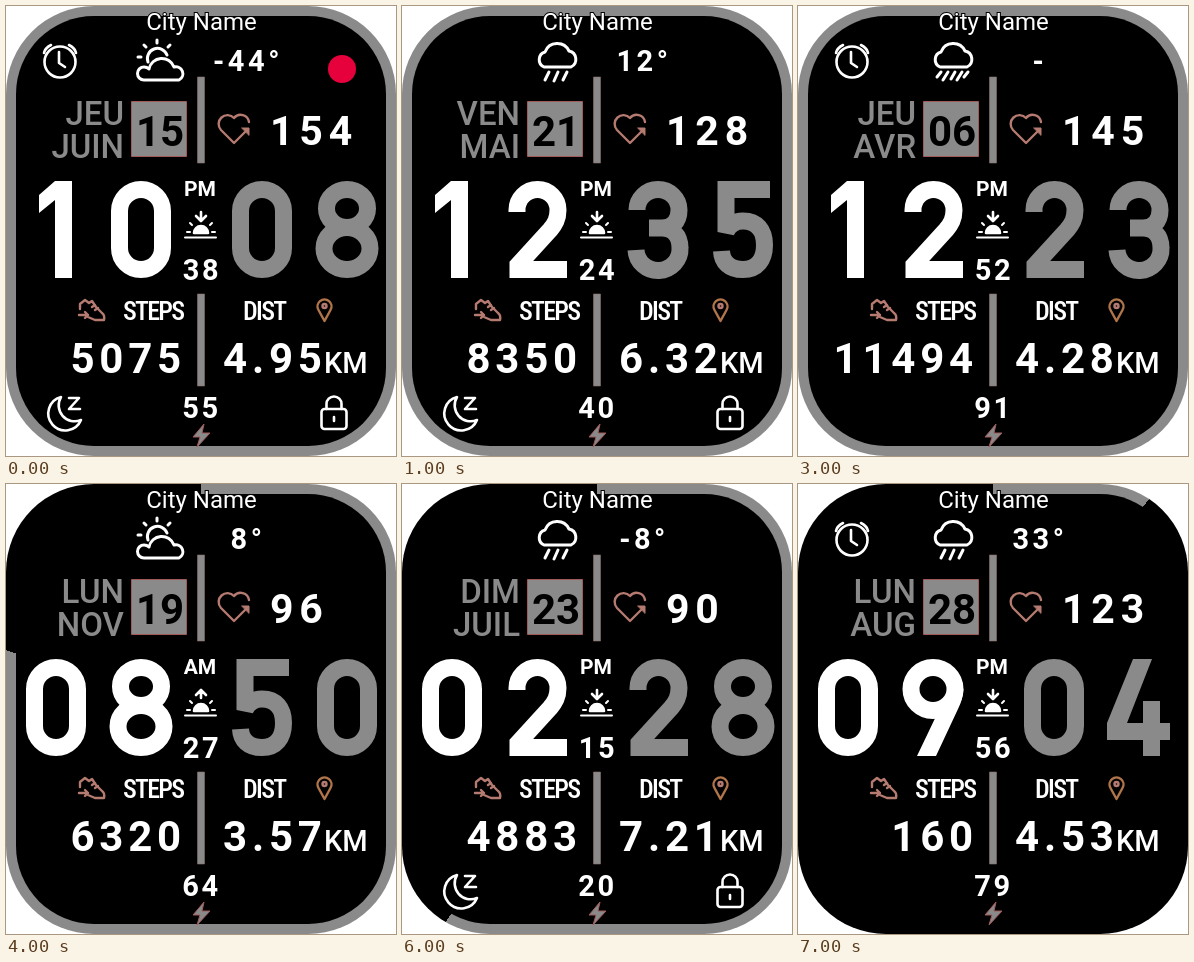
Recreate the animation shown at these times as an HTML page. Size 390 px wide and 450 px high, loop 8000 ms.

```html
<!DOCTYPE html>
<html lang="fr">
<head>
<meta charset="utf-8">
<style>
  html, body { margin: 0; width: 100%; height: 100%; overflow: hidden; background: #fff }
  #ring { position: absolute; width: 390px; height: 450px; border-radius: 88px }
  #ring::after { content: ""; position: absolute; inset: 10px; border-radius: 78px; background: #000 }
  svg { position: absolute; left: 0; top: 0 }
  text { font: 700 41px Roboto, sans-serif; fill: #fff }
  .grey { fill: #8a8a8a }
  .right { text-anchor: end }
  .mid { text-anchor: middle }
  .date { font-size: 33px; font-weight: 500 }
  .value { letter-spacing: 5.8px }
  .low { font-size: 42px; letter-spacing: 4.8px }
  .small { font-size: 29px; letter-spacing: 2.5px }
  .label { font: 500 26px "Roboto Condensed", Roboto, sans-serif; font-stretch: 75%; letter-spacing: -1.7px }
  .city { font-size: 24px; font-weight: 400; stroke: #000; stroke-width: 2; paint-order: stroke }
  .line { fill: none; stroke: currentColor; stroke-width: 17 }
  .fill { fill: currentColor }
  .icon { fill: none; stroke: #fff; stroke-width: 3; stroke-linecap: round; stroke-linejoin: round }
  .thin { stroke-width: 2.6 }
  .rose { stroke: #b57a70; stroke-width: 2.4 }
  .gold { stroke: #b0754a }
  .edged { fill: #8a8a8a; stroke: #a05a5a }
</style>
</head>
<body>
<div id="ring"></div>
<svg width="390" height="450" viewBox="0 0 390 450">
  <defs>
    <rect id="d0" class="line" x="8.5" y="8.5" width="43" height="80" rx="21.5"/>
    <path id="d1" class="fill" d="M46 0H29L13 14V32L29 19V97H46z"/>
    <path id="d2" class="line" d="M10 31V29a20.500 20.500 0 0 1 41 0c0 9-3 14-8 20L11 84V88.500H60"/>
    <path id="d3" class="line" d="M9 29a21 20.500 0 0 1 42 0c0 12-7 18-17 18H21H34c10 0 18 7 18 20a22 21.500 0 0 1-44 2"/>
    <path id="d4" class="fill" d="M24 0H43L18 64H34V42H51V64H61V81H51V97H34V81H-2V64z"/>
    <path id="d5" class="line" d="M57 8.500H13V51c3-7 9-11 17-11c14 0 21.500 9 21.500 24S44 88.500 30 88.500S9 81 8.500 70"/>
    <g id="d8" class="line"><ellipse cx="30" cy="27.5" rx="20.5" ry="19"/><ellipse cx="30" cy="67.5" rx="23" ry="21"/></g>
    <g id="d9"><ellipse class="line" cx="30" cy="30" rx="22" ry="21.5"/><path class="fill" d="M60.500 30Q60 40 55 50L33 97H14L36 51z"/></g>
  </defs>

  <path class="grey" d="M191.500 71h7v86h-7zM191.500 288h7v92h-7z" stroke="#8c6c6c" stroke-width=".6"/>
  <path class="edged" d="M125.500 95.500h55v55h-55z"/>
  <text class="city mid" x="195.500" y="24">City Name</text>
  <text class="label" x="117" y="314">STEPS</text>
  <text class="label" x="237" y="314">DIST</text>
  <text x="318" y="367" style="font-size:29px;font-weight:500">KM</text>

  <text id="day" class="date grey right" x="118" y="119"/>
  <text id="month" class="date grey right" x="118" y="152"/>
  <text id="date" class="mid" x="154" y="140" style="fill:#000;font-size:42px"/>
  <text id="temp" class="small mid" x="242" y="65" style="letter-spacing:3.5px"/>
  <text id="pulse" class="value" x="264" y="139"/>
  <text id="half" class="mid" x="194" y="190" style="font-size:21px"/>
  <text id="second" class="small mid" x="196" y="274"/>
  <text id="steps" class="low right" x="180" y="367"/>
  <text id="distance" class="low" x="217" y="367"/>
  <text id="battery" class="small mid" x="195.500" y="412"/>
  <g id="clock"></g>

  <g class="icon rose">
    <path d="M228 137l-13-13a8 8 0 0 1 13-12a8.500 8.500 0 0 1 15 4M228 137l12-12"/>
    <path d="M236 122h7v7z" fill="#b57a70" stroke-width="1"/>
    <path d="M74 303v-5l5-4 4 3 3-2 4 6 6 6q3 2 2 7h-9l-7-3M73 309h9M79 306l3 3-3 3M86 301l3-2M89 304l3-2"/>
    <path class="gold" d="M318.500 315l-6-11a7 7 0 1 1 12 0z"/>
    <circle cx="318.500" cy="300" r="2"/>
  </g>
  <path class="edged" d="M198 418l-11 13h7l-3 10 13-14h-8z"/>

  <g class="icon thin">
    <path d="M179 231.500h31M181 226h3M206 226h3M184 217l2 2M206 217l-2 2" stroke-width="2"/>
    <path d="M188 227a7 7 0 0 1 14 0z" fill="#fff"/>
    <path id="am" d="M195 214v-7M190 211l5-5 5 5"/>
    <path id="pm" d="M195 206v8M190 210l5 5 5-5"/>
  </g>
  <g id="alarm" class="icon thin">
    <circle cx="54" cy="56" r="15.500"/><path d="M53 46v11l6 4M38 47q1-5 7-8M70 47q-1-5-7-8"/>
  </g>
  <circle id="wireless" cx="336" cy="63" r="14" fill="#e6003c"/>
  <path id="moon" class="icon thin" d="M55 391a17 17 0 1 0 20 23a16 16 0 0 1-20-23zM63 392h10l-10 11h11"/>
  <g id="lock" class="icon thin">
    <rect x="315.500" y="403" width="25" height="20" rx="3"/><path d="M320.500 403v-5a7.500 7.500 0 0 1 15 0v5M328 411v4"/>
  </g>
  <g id="sunny" class="icon">
    <path d="M138 74a6 6 0 0 1 0-13q3 0 5 2a13 13 0 0 1 25-2a7 7 0 0 1 5 13zM142 56a10 10 0 0 1 19-7M151 34v3M138 39l2 2M164 39l-2 2M132 51h3"/>
  </g>
  <g id="cloud" class="icon">
    <path d="M142 61a8 8 0 0 1 1-15a13 13 0 0 1 24-1a8.500 8.500 0 0 1 2 16z"/>
    <path id="rain" d="M147 66l-4 8M156 66l-4 9M165 66l-4 8"/>
    <path id="shower" d="M143 66l-4 5M150 66l-5 8M157 66l-4 7M164 66l-5 8M170 66l-4 5"/>
  </g>
  <g id="haze" class="icon">
    <path d="M155 55c-5-6-8-8-12-8a8 8 0 0 0 0 16c4 0 7-2 12-8s8-8 12-8a8 8 0 0 1 0 16c-4 0-7-2-12-8z"/>
    <path stroke-width="5" d="M143 38h0M155 38h0M167 38h0M143 72h0M155 72h0M167 72h0"/>
  </g>
</svg>
<script>
const fields = ["day", "month", "date", "half", "second", "temp", "pulse", "steps", "distance", "battery"];
const toggles = ["am", "pm", "alarm", "wireless", "moon", "lock", "sunny", "cloud", "rain", "shower", "haze"];

// field values | clock digits | ring tenths | visible icons
const scenes = [
  "JEU JUIN 15 PM 38 -44° 154 5075 4.95 55|1008|10|pm alarm wireless moon lock sunny",
  "VEN MAI 21 PM 24 12° 128 8350 6.32 40|1235|10|pm moon lock cloud rain",
  "MER MAR 15 AM 41 17° 60 7275 0.14 2|0528|6|am moon lock sunny",
  "JEU AVR 06 PM 52 - 145 11494 4.28 91|1223|10|pm alarm cloud shower",
  "LUN NOV 19 AM 27 8° 96 6320 3.57 64|0850|8|am sunny",
  "SAM JUIN 03 PM 09 -5° 155 1942 5.03 19|0349|2|pm alarm wireless lock haze",
  "DIM JUIL 23 PM 15 -8° 90 4883 7.21 20|0228|6|pm moon lock cloud rain",
  "LUN AUG 28 PM 56 33° 123 160 4.53 79|0904|1|pm alarm cloud rain",
].map(row => row.split("|"));

const digitX = [20, 105, 226, 311];
const el = id => document.getElementById(id);
let shown = -1;

function show(index) {
  const [values, digits, tenths, icons] = scenes[index];
  values.split(" ").forEach((value, i) => el(fields[i]).textContent = value);
  const visible = icons.split(" ");
  for (const id of toggles) el(id).style.display = visible.includes(id) ? "" : "none";
  el("clock").innerHTML = [...digits].map((d, i) =>
    `<use href="#d${d}" x="${digitX[i]}" y="175" color="${i < 2 ? "#fff" : "#8a8a8a"}"/>`).join("");
  el("ring").style.background = `conic-gradient(at 50% 51%, #8a8a8a ${tenths * 10}%, #000 0)`;
}

function tick() {
  const index = Math.floor(performance.now() / 1000) % scenes.length;
  if (index !== shown) show(shown = index);
  requestAnimationFrame(tick);
}
tick();
</script>
</body>
</html>
```
